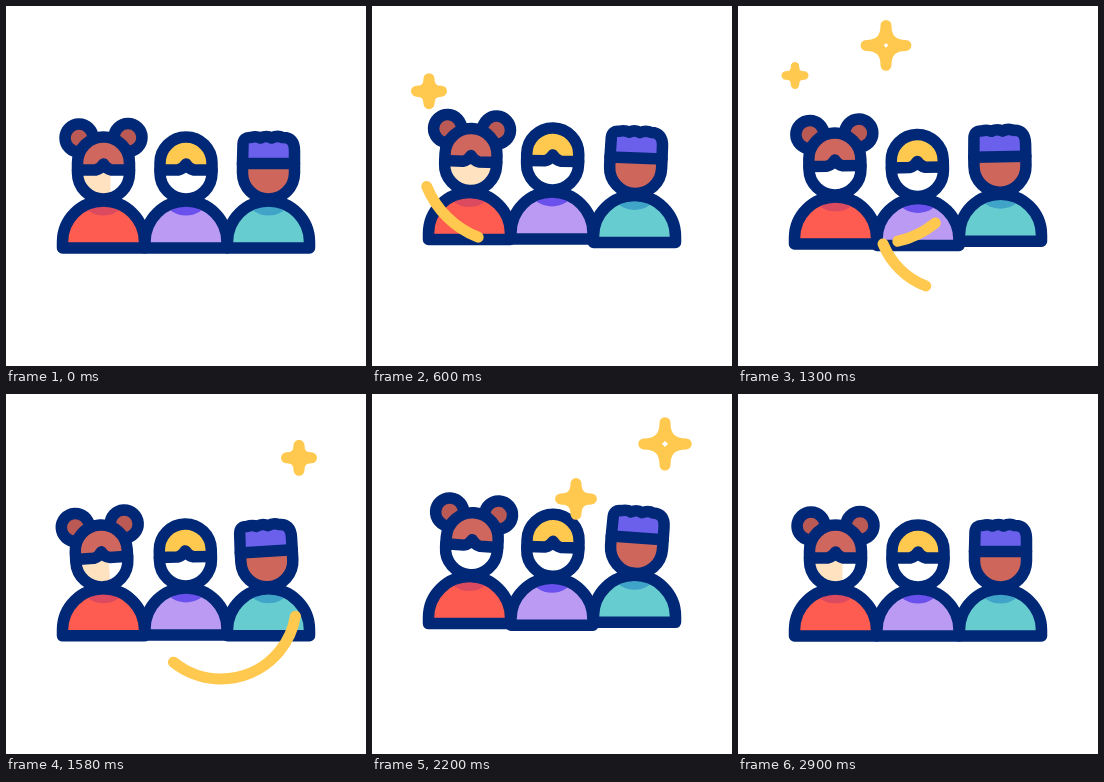
Write an HTML page with a canvas that moves like this. It is 360x360 px and loops after 3040 ms.

```html
<!DOCTYPE html>
<html lang="en">
<head>
<meta charset="utf-8">
<title>Three friends</title>
<style>
  html, body { margin: 0; width: 100%; height: 100%; overflow: hidden; background: #fff; }
  canvas { display: block; width: 360px; height: 360px; }
</style>
</head>
<body>
<canvas id="stage" width="360" height="360"></canvas>
<script>
const ctx = document.getElementById('stage').getContext('2d');
const LOOP = 3040, STEP = 20, START = 220;
const LINE = 11.5, NECK_Y = 195;
const NAVY = '#002876', YELLOW = '#ffc94f';

const clamp = u => Math.max(0, Math.min(1, u));
const mix = (a, b, u) => a + (b - a) * u;
const radians = deg => deg * Math.PI / 180;
const linear = u => u;
const smooth = u => (1 - Math.cos(Math.PI * u)) / 2;
const easeOut = u => 1 - (1 - u) ** 2;
const easeIn = u => u ** 1.7;
const progress = (t, from, to, ease = linear) => ease(clamp((t - from) / (to - from)));

// Hops done so far, 0 to 2; the second hop is quicker
const hopsDone = (t, lag) =>
  progress(t, START + Math.max(0, lag), 1540 + lag) + progress(t, 1540 + lag, 2640 + lag);
const hopHeight = hops => 13.7 * Math.sin(Math.PI * hops) ** 2;

// Rock right, left, right and back to rest in equal eased beats
function sway(t, angle, beat) {
  const poses = [0, 1, -0.9, 1.1, 0];
  const at = Math.max(0, Math.min(3.999, (t - START) / beat));
  const i = Math.floor(at);
  return radians(angle * mix(poses[i], poses[i + 1], smooth(at - i)));
}

function paint(path, fill, stroke) {
  if (fill) { ctx.fillStyle = fill; ctx.fill(path); }
  if (stroke) { ctx.strokeStyle = stroke; ctx.lineWidth = LINE; ctx.stroke(path); }
}

function clipped(path, draw) {
  ctx.save();
  ctx.clip(path);
  draw();
  ctx.restore();
}

// Paths are centred on x = 0
const CHIN = 'V167 A26 26 0 0 1 -26 167 Z';
const ROUND_TOP = 'M-26 157 A26 26 0 0 1 26 157 ';
const CLOUD_TOP = 'M-26 157 L-25.5 138 Q-25 131 -18 131.5 Q-12 130 -8 132 Q-2 129 3 132 Q9 129 14 131.5 Q26 131 26 145 ';
const DOME = new Path2D('M-41 242 V236 A41 41 0 0 1 41 236 V242 Z');
const ROUND = {
  head: new Path2D(ROUND_TOP + CHIN),
  hair: new Path2D(ROUND_TOP + 'V164 H-26 Z'),
  fringe: new Path2D('M-26 164 H-8 Q-3 163 0 158 Q3 163 8 164 H26')
};
const CLOUD = {
  head: new Path2D(CLOUD_TOP + CHIN),
  hair: new Path2D(CLOUD_TOP + 'V157.5 H-26 Z'),
  fringe: new Path2D('M-26 157.5 H26')
};
const BUNS = new Path2D('M-38.5 132 a14 14 0 1 0 28 0 a14 14 0 1 0 -28 0 Z M10.5 131.5 a14 14 0 1 0 28 0 a14 14 0 1 0 -28 0 Z');

// blush gives the width of the tinted part of the face
const people = [
  {
    x: 97.5, lag: 0, angle: 3.8, beat: 670, shape: ROUND, buns: '#bb5a54',
    shirt: '#ff5c51', collar: '#dc4a60', hair: '#d0675e', skin: '#fff', tint: '#ffe3c0',
    blush: hops => hops % 1 < 0.1 ? 33 : hops % 1 < 0.32 ? 52 : 0
  },
  {
    x: 180, lag: -60, angle: 1.7, beat: 610, shape: ROUND,
    shirt: '#bb9af3', collar: '#6a50ec', hair: YELLOW, skin: '#fff', tint: '#fcc4bf',
    blush: hops => hops > 0.58 && hops < 0.72 ? 36 : 0
  },
  {
    x: 262.5, lag: 90, angle: 3.8, beat: 670, shape: CLOUD,
    shirt: '#67ccd0', collar: '#3fa4c8', hair: '#6a60ec', skin: '#ce665c',
    blush: () => 0
  }
];

function drawBody(p) {
  paint(DOME, p.shirt);
  clipped(DOME, () => {
    ctx.fillStyle = p.collar;
    ctx.beginPath();
    ctx.ellipse(0, NECK_Y, 20, 14.5, 0, 0, Math.PI * 2);
    ctx.fill();
  });
  paint(DOME, null, NAVY);
}

function drawHead(p, hops) {
  const { head, hair, fringe } = p.shape;
  if (p.buns) paint(BUNS, p.buns, NAVY);
  paint(head, p.skin);
  clipped(head, () => {
    ctx.fillStyle = p.tint;
    ctx.fillRect(-26, 160, p.blush(hops), 33);
  });
  paint(hair, p.hair);
  paint(fringe, null, NAVY);
  paint(head, null, NAVY);
}

function drawPerson(p, t) {
  const hops = hopsDone(t, p.lag);
  ctx.save();
  ctx.translate(p.x, -hopHeight(hops));
  drawBody(p);
  ctx.translate(0, NECK_Y);
  ctx.rotate(sway(t, p.angle, p.beat));
  ctx.translate(0, -NECK_Y);
  drawHead(p, hops);
  ctx.restore();
}

const STAR_LIFE = 920, STAR_RISE = 0.0225;
const stars = [
  { x: 57, y: 88.8, born: 440 },
  { x: 148, y: 54, born: 650 },
  { x: 293, y: 67, born: 1440 },
  { x: 204, y: 114.4, born: 1780 }
];

// Pops in, grows while rising, then shrinks away
function drawStar(star, t) {
  const age = t - star.born;
  if (age <= 0 || age >= STAR_LIFE) return;
  const scale = progress(age, 0, 120) * (1 - progress(age, 800, STAR_LIFE));
  const r = scale * mix(18, 27, progress(age, 160, 840, smooth));
  const width = Math.min(11, r * 0.62), d = r - width / 2;
  ctx.save();
  ctx.translate(star.x, star.y - age * STAR_RISE);
  ctx.beginPath();
  ctx.moveTo(d, 0);
  for (let i = 1; i <= 4; i++) {
    const a = i * Math.PI / 2;
    ctx.quadraticCurveTo(0, 0, d * Math.cos(a), d * Math.sin(a));
  }
  ctx.closePath();
  ctx.strokeStyle = YELLOW;
  ctx.lineWidth = width;
  ctx.stroke();
  ctx.restore();
}

// Each swoosh is an arc whose head runs ahead of its tail
const swooshes = [
  { x: 139.5, y: 146, r: 91.5, start: 180, end: 50,
    head: [240, 1390, easeOut], tail: [408, 1536, linear] },
  { x: 215, y: 209.5, r: 75.5, start: 158, end: -8,
    head: [1069, 1717, smooth], tail: [1290, 2100, easeIn] }
];

function drawSwoosh(s, t) {
  const head = progress(t, ...s.head), tail = progress(t, ...s.tail);
  if (head <= tail) return;
  const angle = u => radians(mix(s.start, s.end, u));
  ctx.beginPath();
  ctx.arc(s.x, s.y, s.r, angle(tail), angle(head), true);
  ctx.strokeStyle = YELLOW;
  ctx.lineWidth = 11;
  ctx.stroke();
}

function render(now) {
  const t = Math.floor((now % LOOP) / STEP) * STEP;
  ctx.fillStyle = '#fff';
  ctx.fillRect(0, 0, 360, 360);
  ctx.lineCap = ctx.lineJoin = 'round';
  people.forEach(p => drawPerson(p, t));
  swooshes.forEach(s => drawSwoosh(s, t));
  stars.forEach(s => drawStar(s, t));
}

const began = performance.now();
function tick() {
  render(performance.now() - began);
  requestAnimationFrame(tick);
}
tick();
</script>
</body>
</html>
```
